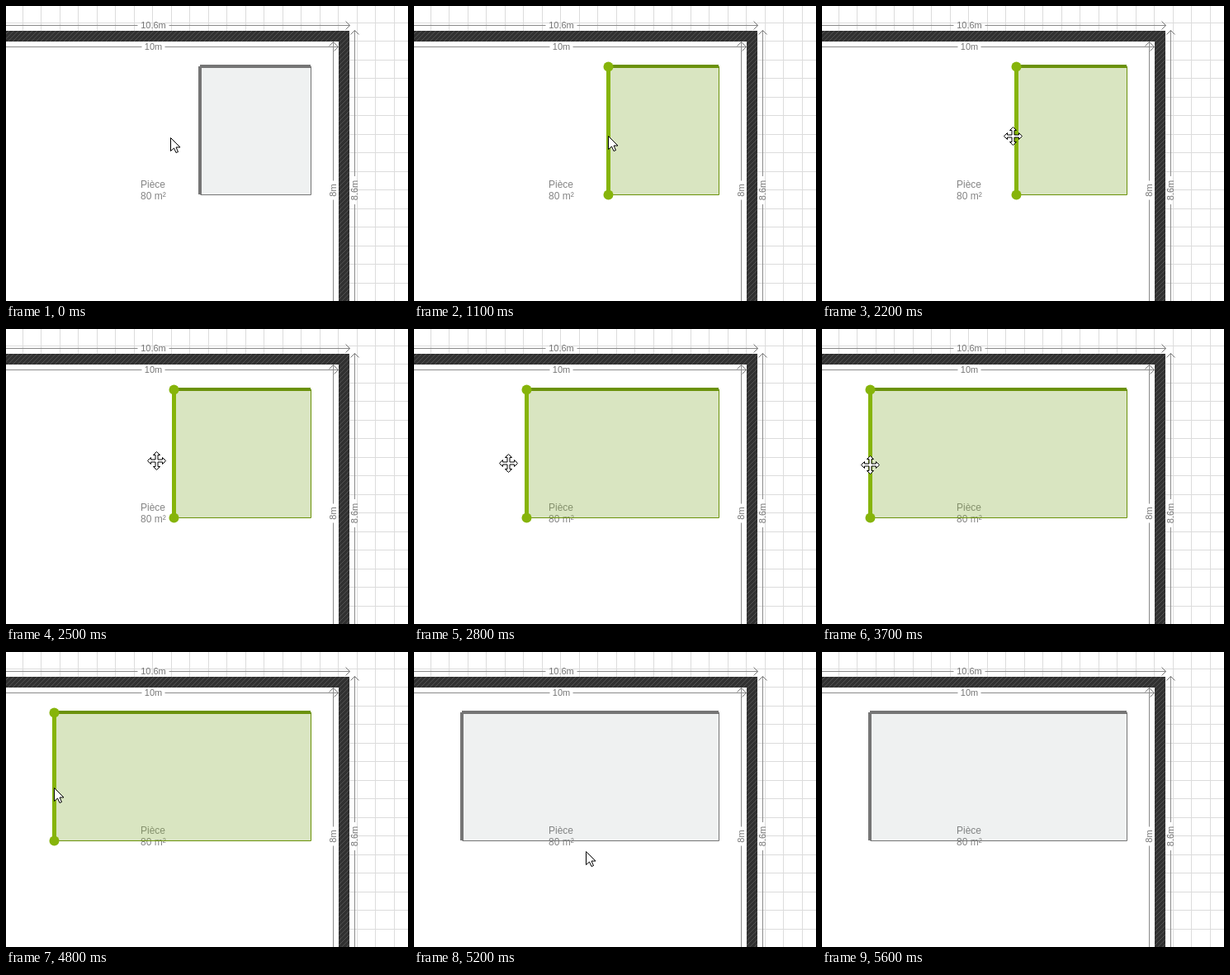
These frames come from a looping animation (487 by 357 pixels, 6100 ms). An HTML page with a canvas:

```html
<!DOCTYPE html>
<html lang="fr">
<head>
<meta charset="utf-8">
<title>Plan</title>
<style>
html, body { margin: 0; width: 100%; height: 100%; overflow: hidden; background: #fff; }
canvas { display: block; }
</style>
</head>
<body>
<canvas id="stage" width="487" height="357"></canvas>
<script>
const W = 487, H = 357, LOOP = 6100, STEP = 100;
const FONT = '"Liberation Sans", Arial, sans-serif';
const ctx = document.getElementById('stage').getContext('2d');

const clamp = (v, lo, hi) => Math.min(Math.max(v, lo), hi);
const ease = k => k * k * (3 - 2 * k);

// The pointer rests between these eased moves
const home = { x: 199, y: 159 };
const moves = [
  { from: 600, to: 1100, x: 235, y: 157 },
  { from: 2100, to: 3150, x: 72, y: 164 },
  { from: 3300, to: 3600, x: 58, y: 164 },
  { from: 4900, to: 5600, x: 440, y: 360 }
];

function pointerAt(t) {
  let { x, y } = home;
  for (const m of moves) {
    const k = ease(clamp((t - m.from) / (m.to - m.from), 0, 1));
    x += (m.x - x) * k;
    y += (m.y - y) * k;
  }
  return { x: Math.round(x), y: Math.round(y) };
}

function line(points, color, width = 1) {
  ctx.beginPath();
  points.forEach(([x, y]) => ctx.lineTo(x, y));
  ctx.strokeStyle = color;
  ctx.lineWidth = width;
  ctx.stroke();
}

function grid() {
  for (let i = 0; i < 22; i++) {
    const p = Math.floor(20 + 22.5 * i) + 0.5;
    line([[p, 0], [p, H]], '#dcdcdc');
    line([[0, p], [W, p]], '#dcdcdc');
  }
}

function walls() {
  ctx.fillStyle = '#fff';
  ctx.fillRect(0, 43, 403, H);
  ctx.save();
  ctx.beginPath();
  ctx.rect(0, 30, 416, 13);
  ctx.rect(403, 43, 13, H);
  ctx.clip();
  ctx.fillStyle = '#303030';
  ctx.fillRect(0, 0, W, H);
  const gap = 4 * Math.SQRT2;
  for (let s = gap; s < W + H; s += gap) line([[s, 0], [s - H, H]], '#555');
  ctx.restore();
}

// Dimension line ending in an arrow at the local origin, split around its label
function dimension(x, y, angle, label, at, gap) {
  ctx.save();
  ctx.translate(x, y);
  ctx.rotate(angle);
  line([[-W, 0], [at - gap / 2, 0]], '#8a8a8a');
  line([[at + gap / 2, 0], [0, 0]], '#8a8a8a');
  line([[-5, -5], [0, 0], [-5, 5]], '#777');
  ctx.fillStyle = '#757575';
  ctx.font = '11px ' + FONT;
  ctx.textAlign = 'center';
  ctx.fillText(label, at, 3.5);
  ctx.restore();
}

function dimensions() {
  const up = -Math.PI / 2;
  dimension(416.5, 23.5, 0, '10.6m', -238, 38);
  dimension(402.5, 49.5, 0, '10m', -224, 28);
  dimension(396.5, 43.5, up, '8m', -179.5, 23);
  dimension(422.5, 29.5, up, '8.6m', -193.5, 34);
}

function roomLabel() {
  ctx.fillStyle = '#858585';
  ctx.font = '12px ' + FONT;
  ctx.textAlign = 'left';
  ctx.fillText('Pièce', 163, 220);
  ctx.fillText('80 m²', 163, 234);
}

function dot(x, y) {
  ctx.beginPath();
  ctx.arc(x, y, 6, 0, Math.PI * 2);
  ctx.fillStyle = '#86b40a';
  ctx.fill();
}

function area(left, active) {
  const x = left + 0.5, edge = active ? '#6b920a' : '#757575';
  ctx.fillStyle = active ? 'rgba(128,168,52,.3)' : 'rgba(95,115,115,.1)';
  ctx.fillRect(x, 73, 369 - x, 155);
  line([[369.5, 73], [369.5, 228.5], [x, 228.5]], edge);
  line([[left, 73], [369, 73]], edge, 4);
  if (active) {
    line([[x, 73], [x, 228]], '#86b40a', 5);
    dot(x, 73.5);
    dot(x, 228.5);
  } else {
    line([[left, 73], [left, 228]], edge, 4);
  }
}

const arrow = [[0, 0], [0, 16], [4, 12.5], [6.5, 18], [9, 17], [6.5, 11.5], [11.5, 11.5]];
const limb = [[-1.5, -1.5], [-1.5, -7], [-4, -7], [0, -11], [4, -7], [1.5, -7]];
const cross = [];
// Four quarter turns of one limb
for (let i = 0, c = 1, s = 0; i < 4; i++, [c, s] = [-s, c])
  limb.forEach(([x, y]) => cross.push([x * c - y * s, x * s + y * c]));

function cursor(points, { x, y }) {
  ctx.save();
  ctx.translate(x + 0.5, y + 0.5);
  ctx.beginPath();
  points.forEach(p => ctx.lineTo(p[0], p[1]));
  ctx.closePath();
  ctx.fillStyle = '#fff';
  ctx.fill();
  ctx.strokeStyle = '#000';
  ctx.lineWidth = 1;
  ctx.stroke();
  ctx.restore();
}

function draw(t) {
  ctx.fillStyle = '#fff';
  ctx.fillRect(0, 0, W, H);
  grid();
  walls();
  dimensions();
  roomLabel();
  // The dragged edge trails the pointer by one step
  const left = pointerAt(clamp(t - STEP, 1200, 3800)).x;
  area(left, t >= 1000 && t < 5100);
  cursor(t >= 2200 && t < 4800 ? cross : arrow, pointerAt(t));
}

const start = performance.now();
function tick() {
  const t = (performance.now() - start) % LOOP;
  draw(Math.floor(t / STEP) * STEP);
  requestAnimationFrame(tick);
}
tick();
</script>
</body>
</html>
```
